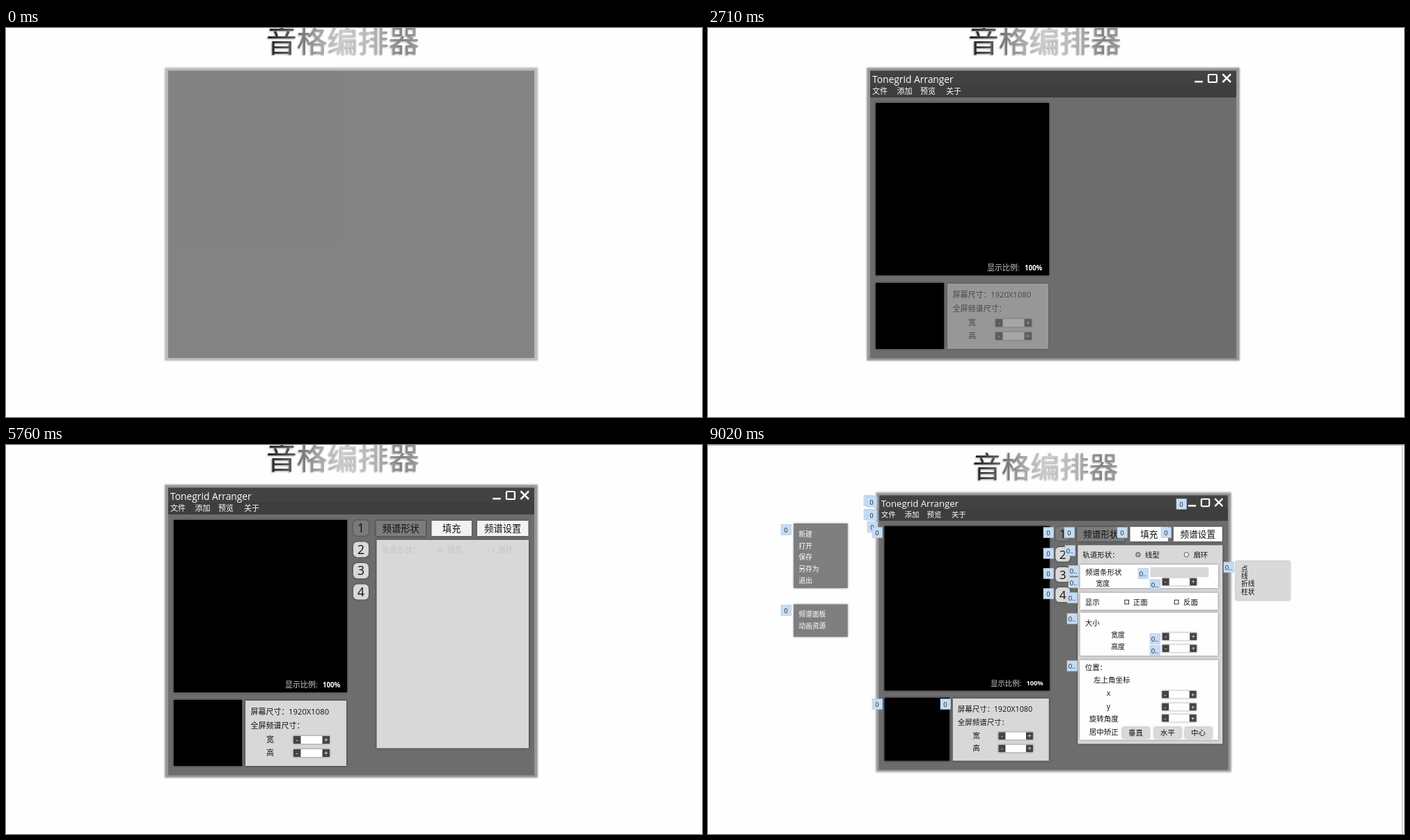
An HTML page that plays this animation: 1000x560 px, repeating every 9.11 s.

```html
<!DOCTYPE html>
<html lang="zh">
<head>
<meta charset="utf-8">
<title>音格编排器</title>
<style>
html, body { margin: 0; width: 100%; height: 100%; overflow: hidden; background: #fefefe; }
svg { display: block; width: 1000px; height: 560px; font-family: "Open Sans", "Noto Sans CJK SC", "Noto Sans CJK", sans-serif; }
.zoom { transform-box: fill-box; transform-origin: center; }
.dark { filter: drop-shadow(0 0 1.5px rgba(0, 0, 0, .65)); }
.soft { filter: drop-shadow(0 0 1.5px rgba(0, 0, 0, .45)); }
.heading { font-weight: 500; filter: drop-shadow(-1px 1px 1px rgba(0, 0, 0, .4)); }
.card { fill: #f2f2f2; animation: card 9110ms linear infinite; }
#slide { animation: edit 9110ms linear infinite; }
#editor { opacity: 0; animation: editor 9110ms linear infinite; }
@keyframes edit {
  0%, 97.03% { transform: none; }
  97.04%, 100% { transform: matrix(.9525, 0, 0, .954, 24, 13.8); }
}
@keyframes editor { 0%, 97.03% { opacity: 0; } 97.04%, 100% { opacity: 1; } }
@keyframes card { 0%, 97.03% { fill: #f2f2f2; } 97.04%, 100% { fill: #fefefe; } }
</style>
</head>
<body>
<svg viewBox="0 0 1000 560">
  <defs>
    <linearGradient id="metal" gradientUnits="userSpaceOnUse" x1="375" x2="595" y1="0" y2="0">
      <stop offset="0" stop-color="#1c1c1c"/>
      <stop offset=".2" stop-color="#6c6c6c"/>
      <stop offset=".34" stop-color="#a4a4a4"/>
      <stop offset=".5" stop-color="#d2d2d2"/>
      <stop offset=".7" stop-color="#b4b4b4"/>
      <stop offset=".88" stop-color="#828282"/>
      <stop offset="1" stop-color="#a0a0a0"/>
    </linearGradient>
    <filter id="blur" x="-5%" y="-5%" width="110%" height="110%"><feGaussianBlur stdDeviation="1.1"/></filter>
  </defs>
  <g id="slide"></g>
  <g id="editor"></g>
</svg>
<script>
const LOOP = 9110;
const slide = document.getElementById('slide');
const sheet = document.createElement('style');
let count = 0, rules = '', markup = '';

const rect = (x, y, r, b, fill, extra = '') =>
  `<rect x="${x}" y="${y}" width="${r - x}" height="${b - y}" fill="${fill}" ${extra}/>`;
const card = (x, y, r, b) =>
  `<g class="soft"><rect class="card" x="${x}" y="${y}" width="${r - x}" height="${b - y}"/></g>`;
// cy is the middle of the glyphs
const text = (s, x, cy, size = 11, fill = '#111', extra = '') =>
  `<text x="${x}" y="${cy + size * .37}" font-size="${size}" fill="${fill}" ${extra}>${s}</text>`;
const middle = 'text-anchor="middle"';
const lines = (words, x, ys, size, fill) => words.map((w, i) => text(w, x, ys[i], size, fill)).join('');

const stepper = (x, cy) => rect(x, cy - 5.5, x + 52, cy + 5.5, '#fff', 'class="soft"')
  + rect(x, cy - 5.5, x + 10.5, cy + 5.5, '#444') + rect(x + 41.5, cy - 5.5, x + 52, cy + 5.5, '#444')
  + text('-', x + 5.2, cy, 10, '#fff', middle) + text('+', x + 46.8, cy, 10, '#fff', middle);

const percent = ms => (ms / LOOP * 100).toFixed(3) + '%';

function show(start, end, body, zoom) {
  const name = 'in' + count++;
  const from = zoom ? 'transform:scale(0)' : 'opacity:0';
  const to = zoom ? 'transform:scale(1)' : 'opacity:1';
  rules += `@keyframes ${name}{0%,${percent(start)}{${from}}${percent(end)},100%{${to}}}
.${name}{animation:${name} ${LOOP}ms linear infinite}`;
  markup += `<g class="${name}${zoom ? ' zoom' : ''}">${body}</g>`;
}

markup += text('音格编排器', 374, 19, 44, 'url(#metal)', 'class="heading"');

// window, already partly visible when the loop begins
rules += `@keyframes window{0%,1.3%{opacity:.656}${percent(330)},100%{opacity:1}}
.window{animation:window ${LOOP}ms linear infinite}`;
markup += '<g class="window">' + rect(228, 57, 764, 479, '#969696', 'filter="url(#blur)"')
  + rect(233, 61.5, 759, 475, '#424242') + '</g>';

// the menu strip and the body stand behind the header labels
show(1290, 1700, rect(233, 82, 759, 100, '#3e3e3e') + rect(233, 100, 759, 475.5, '#6d6d6d'));

show(300, 700, text('Tonegrid Arranger', 236, 73.5, 13.8, '#fff')
  + rect(699, 76, 711, 78.5, '#fff', 'rx="1"')
  + '<rect x="719" y="67" width="12" height="11" rx="1.5" fill="none" stroke="#fff" stroke-width="2.2"/>'
  + '<path d="M739.5 66.5l11.5 11.5m0-11.5l-11.5 11.5" stroke="#fff" stroke-width="2.5"/>');
show(700, 1110, [['文件', 236], ['添加', 271.5], ['预览', 305], ['关于', 342]]
  .map(([s, x]) => text(s, x, 90.5, 11, '#fff', 'font-weight="500"')).join(''));

show(1650, 2030, rect(241, 108, 490, 356, '#000', 'class="dark"')
  + text('显示比例:', 401, 345, 11, '#c8c8c8')
  + text('100%', 455, 345, 9.7, '#fff', 'font-weight="700"'));
show(2130, 2550, rect(241, 367, 339, 462, '#000', 'class="dark"'));
show(2550, 2960, rect(344, 368, 489, 462, '#d8d8d8', 'class="dark"')
  + text('屏幕尺寸：', 351.5, 384) + text('1920X1080', 406, 384, 11.3)
  + text('全屏频谱尺寸：', 351.5, 404) + text('宽', 374, 424) + text('高', 374, 443)
  + stepper(413, 424.5) + stepper(413, 443.5));

// numbered buttons
[[3100, 119.5], [3470, 150.5], [3900, 181], [4300, 211.5]].forEach(([t, y], i) =>
  show(t, t + 390, rect(499, y - 11, 521, y + 11, i ? '#d9d9d9' : '#7a7a7a', 'rx="6" class="soft"')
    + text(i + 1, 510, y, 17.5, '#111', middle), true));

// tabs
[['频谱形状', 531.5, 603], ['填充', 611.5, 669], ['频谱设置', 677, 750.5]].forEach(([s, x, r], i) =>
  show(4800, 5200, (i ? card(x, 109, r, 131) : rect(x, 109, r, 131, '#7c7c7c', 'class="dark"'))
    + text(s, (x + r) / 2, 120, 13.3, '#111', middle), true));

show(5200, 5680, rect(532.5, 136.5, 751, 436.5, '#d8d8d8', 'class="dark"'));

const radio = (x, fill) => `<circle cx="${x}" cy="151" r="3.4" fill="${fill}" stroke="#444"/>`;
show(5720, 6130, text('轨道形状：', 540, 151) + radio(623.5, '#b0b0b0') + text('线型', 634, 151)
  + radio(696.5, '#fff') + text('扇环', 707, 151));

show(6130, 6540, card(536, 166, 744.5, 201.5) + text('频谱条形状', 544, 178)
  + rect(642, 170, 730, 185, '#d9d9d9') + text('宽度', 560, 195, 10.3) + stepper(660, 192));

show(6540, 6960, rect(771, 161, 852.5, 219.5, '#d9d9d9', 'class="soft"')
  + lines(['点', '线', '折线', '柱状'], 779, [172, 183.5, 195, 207], 10.3));

const check = x => `<rect x="${x}" y="219.5" width="6" height="6" fill="#fff" stroke="#222"/>`;
show(7100, 7550, card(536, 208.5, 744, 234) + text('显示', 543.5, 223)
  + check(603.5) + text('正面', 616, 223) + check(678.5) + text('反面', 692, 223));

show(7690, 8090, card(536, 238.5, 744, 303.5) + text('大小', 543.5, 254)
  + lines(['宽度', '高度'], 583, [272, 290], 10.3) + stepper(660, 274.5) + stepper(660, 292.5));

show(8090, 8480, card(535.5, 310, 744.5, 430.5)
  + text('位置：', 543.5, 321) + text('左上角坐标', 556.5, 340)
  + text('x', 576, 360) + text('y', 576, 380) + lines(['旋转角度', '居中矫正'], 550, [399, 419])
  + [362, 380.7, 397.7].map(y => stepper(659.5, y)).join('')
  + [['垂直', 600], ['水平', 648], ['中心', 694.5]].map(([s, x]) =>
    rect(x, 411.5, x + 40.5, 428, '#d9d9d9', 'class="soft"') + text(s, x + 20, 419.5, 11, '#111', middle)).join(''));

show(8440, 8780, rect(104, 104, 185.5, 201.5, '#7f7f7f', 'class="soft"')
  + lines(['新建', '打开', '保存', '另存为', '退出'], 111.5, [120, 137.5, 154.8, 172.3, 190], 10.3, '#fff')
  + rect(104, 226, 185.5, 275, '#7f7f7f', 'class="soft"')
  + lines(['频谱面板', '动画资源'], 111.5, [241, 258], 10.3, '#fff'));

// animation order tags of the editing view
const tag = (x, y, s) => rect(x - 7, y - 7.5, x + 7.5, y + 7.5, '#c6dcf4', 'stroke="#a9c6e6" stroke-width=".6"')
  + text(s, x, y + .5, 9.5, '#222', middle);
const short = [[231, 80], [235, 82], [231, 100], [235, 101], [236, 118], [243, 126], [680, 85], [112, 122], [112, 238],
  [489, 126], [519, 126], [595, 126], [658, 126], [489, 156], [489, 185], [489, 214], [243, 373], [341, 373]];
const long = [[520, 152], [525, 181], [525, 198], [523, 220], [625, 185], [642, 201], [523, 250],
  [642, 279], [642, 296], [523, 318], [748, 176]];
document.getElementById('editor').innerHTML = rect(0, 0, 1000, 1, '#c4c4c4') + rect(996.5, 0, 998.5, 560, '#cfcfcf')
  + short.map(([x, y]) => tag(x, y, '0')).join('') + long.map(([x, y]) => tag(x, y, '0..')).join('');

sheet.textContent = rules;
document.head.append(sheet);
slide.innerHTML = markup;
</script>
</body>
</html>
```
